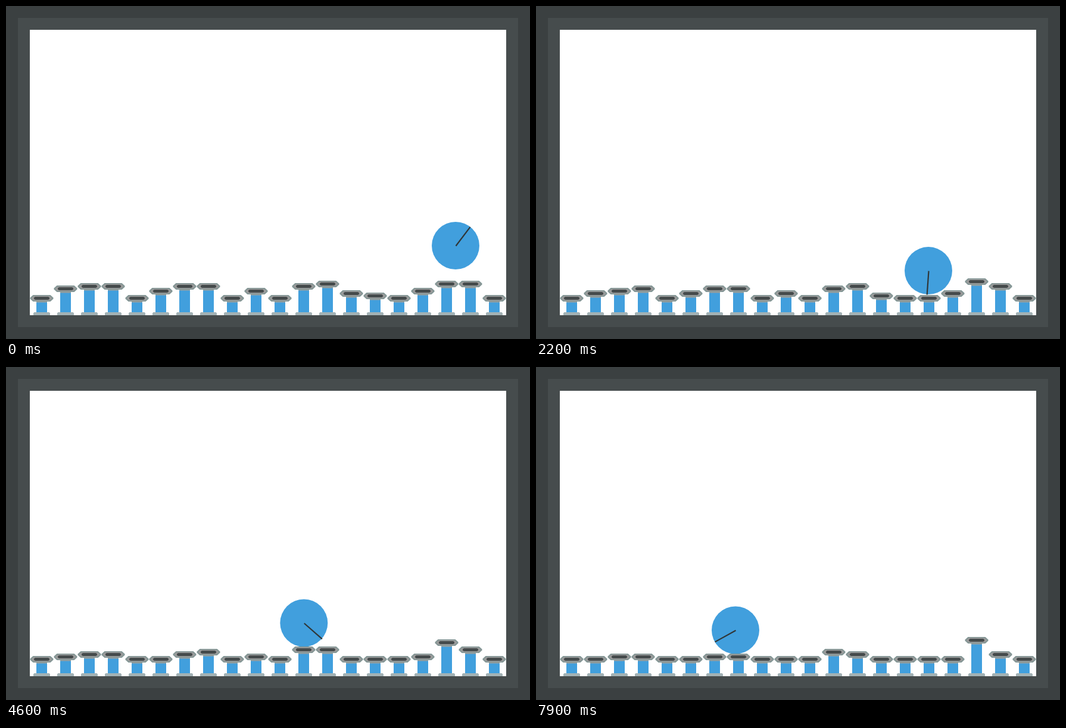
An HTML page with a canvas for the animation above (8 s loop, 880 by 560 pixels).

```html
<!DOCTYPE html>
<html lang="en">
<head>
<meta charset="utf-8">
<title>Pistons and ball</title>
<style>
  html, body { margin: 0; width: 880px; height: 560px; overflow: hidden; background: #3b4041; }
  canvas { display: block; }
</style>
</head>
<body>
<canvas id="stage" width="880" height="560"></canvas>
<script>
const ctx = document.getElementById('stage').getContext('2d');
const LOOP = 8000, STEP = 100, RADIUS = 40, FLOOR = 520, REST = 491, LIFT = 4;
const BLUE = '#419fdd';

// starting height of each piston, in lifts
const levels = [...'04550355030562103660'].map(Number);

// lifts per second: most sink alike, one lags and one rises
const rates = levels.map(() => -0.5);
rates[11] = -0.25;
rates[17] = 0.25;

// time, ball x, spoke angle in degrees
const keys = [
  [0, 755, -53], [900, 742, -139], [2200, 659, -266], [3700, 559, -588.5],
  [5500, 445, -769], [6700, 382, -859], [7900, 335, -929]
];

const slope = i => (keys[i + 1][1] - keys[i][1]) / (keys[i + 1][0] - keys[i][0]);

// harmonic mean of the neighbouring slopes, so the ball never turns back
function speed(i) {
  const before = slope(Math.max(0, i - 1));
  const after = slope(Math.min(keys.length - 2, i));
  return 2 * before * after / (before + after);
}

function roll(t) {
  let i = 0;
  while (i < keys.length - 2 && t >= keys[i + 1][0]) i++;
  const [t0, x0, a0] = keys[i], [t1, x1, a1] = keys[i + 1];
  const span = t1 - t0, u = (t - t0) / span, v = 1 - u;
  const x = x0 * v * v * (1 + 2 * u) + x1 * u * u * (3 - 2 * u)
    + span * u * v * (speed(i) * v - speed(i + 1) * u);
  return { x, angle: (a0 + (a1 - a0) * u) * Math.PI / 180 };
}

// whole lifts, each piston stepping a little later than its left neighbour
function pistonY(i, t) {
  const level = levels[i] + rates[i] * t / 1000 + 0.045 * i;
  return REST - LIFT * Math.max(0, Math.floor(level));
}

// the ball drops, then rests on whichever head or head corner is highest below it
function ballY(x, t, pistons) {
  let y = 403 + 80 * (t / 1000) ** 2;
  for (const [px, py] of pistons) {
    const out = Math.max(0, Math.abs(x - px) - 19);
    if (out < RADIUS) y = Math.min(y, py - 4.5 - Math.sqrt(RADIUS ** 2 - out ** 2));
  }
  return y;
}

function rect(color, x, y, w, h) {
  ctx.fillStyle = color;
  ctx.fillRect(x, y, w, h);
}

// flat bar with cut corners, centred on x, y
function bar(color, x, y, w, h, cut) {
  const l = x - w / 2, r = x + w / 2, t = y - h / 2, b = y + h / 2;
  ctx.fillStyle = color;
  ctx.beginPath();
  ctx.moveTo(l + cut, t);
  ctx.lineTo(r - cut, t);
  ctx.lineTo(r, y - 1);
  ctx.lineTo(r, y + 1);
  ctx.lineTo(r - cut, b);
  ctx.lineTo(l + cut, b);
  ctx.lineTo(l, y + 1);
  ctx.lineTo(l, y - 1);
  ctx.fill();
}

function rod(x, y) {
  rect(BLUE, x - 9, y, 18, FLOOR - y);
  rect('#a3b2b5', x - 14, 516, 28, 4);
  rect('#a3b2b5', x - 13, 515, 26, 1);
}

function head(x, y) {
  const mid = y + 0.5;
  rect('#9a9fa0', x - 9, mid + 4, 18, 3);
  bar('#829695', x, mid, 39, 11, 5);
  bar('#999a9a', x, mid, 34, 8, 4);
  bar('#444a4b', x, mid, 26, 5, 2);
}

function ball(x, y, angle) {
  ctx.fillStyle = BLUE;
  ctx.beginPath();
  ctx.arc(x, y, RADIUS, 0, 2 * Math.PI);
  ctx.fill();
  ctx.strokeStyle = '#303637';
  ctx.lineWidth = 2.2;
  ctx.beginPath();
  ctx.moveTo(x + 0.5, y + 0.5);
  ctx.lineTo(x + 0.5 + RADIUS * Math.cos(angle), y + 0.5 + RADIUS * Math.sin(angle));
  ctx.stroke();
}

function draw(t) {
  rect('#3b4041', 0, 0, 880, 560);
  rect('#464c4d', 20, 20, 840, 520);
  rect('#fff', 40, 40, 800, 480);
  const pistons = levels.map((_, i) => [60 + 40 * i, pistonY(i, t)]);
  const { x, angle } = roll(t);
  pistons.forEach(([px, py]) => rod(px, py));
  ball(x, ballY(x, t, pistons), angle);
  pistons.forEach(([px, py]) => head(px, py));
}

const start = performance.now();
function tick() {
  const t = (performance.now() - start) % LOOP;
  draw(Math.floor(t / STEP) * STEP);
  requestAnimationFrame(tick);
}
tick();
</script>
</body>
</html>
```
